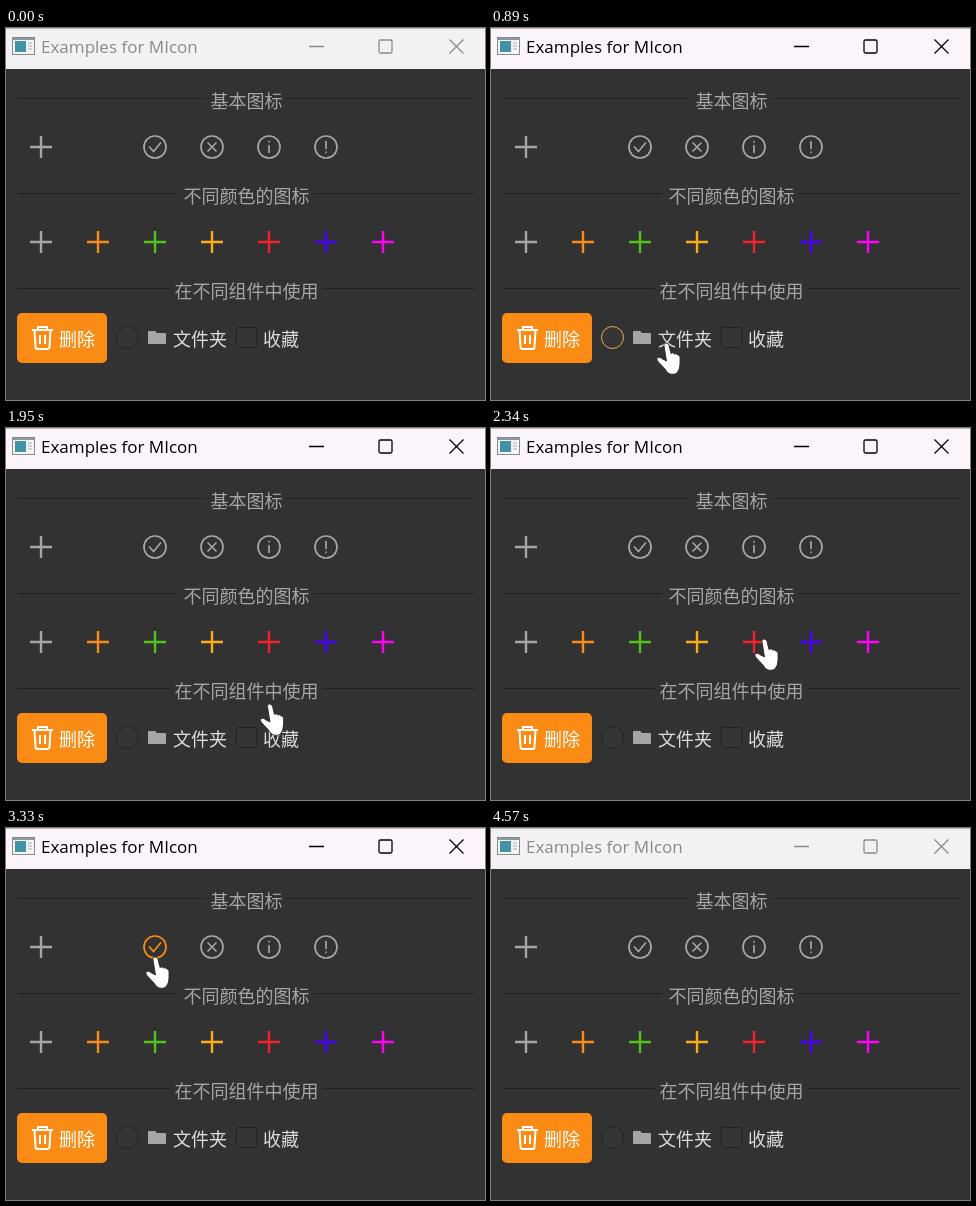
These frames come from a looping animation (479 by 372 pixels, 4650 ms). An HTML page:

```html
<!DOCTYPE html>
<html lang="zh-CN">
<head>
<meta charset="utf-8">
<title>Examples for MIcon</title>
<style>
  html, body { margin: 0; width: 100%; height: 100%; overflow: hidden; background: #323232; }
  svg { display: block; width: 479px; height: 372px; }
  text { font: 300 18px "Noto Sans CJK SC", "Noto Sans CJK", sans-serif; fill: #dcdcdc; }
  .line { fill: none; stroke: currentColor; }
  #bar { color: #8a8a8a; }
  #bar.active { color: #000; }
  #bar text { font: 400 17px "Open Sans", "Noto Sans", sans-serif; fill: currentColor; }
  #bar .back { fill: #f4f1f4; }
  #bar.active .back { fill: #fbf5fb; }
  .heading { fill: #a6a6a6; text-anchor: middle; }
  .icon { color: #a6a6a6; }
  .icon.hover { color: #fa8c16; }
  #radio, #box rect { fill: #353535; stroke: #202320; }
  #radio.hover { stroke: #f7a850; }
  #box.hover rect { stroke: #fa8c16; }
  #box path { visibility: hidden; }
  #box.checked rect { fill: #fa8c16; stroke: #fa8c16; }
  #box.checked path { visibility: visible; }
</style>
</head>
<body>
<svg viewBox="0 0 479 372">
  <rect width="479" height="372" fill="#323232"/>
  <g id="bar">
    <rect class="back" width="479" height="41"/>
    <path d="M0 .5H479" stroke="#b5b5b5"/>
    <rect x="6.500" y="9.500" width="22" height="17" fill="#f4f4f4" stroke="#858b90"/>
    <path d="M7 11H28" stroke="#8f979d" stroke-width="2"/>
    <rect x="9" y="13" width="11" height="11" fill="#4293a5"/>
    <path d="M22 15h4M22 18h4M22 21h4" stroke="#b0b0b0"/>
    <text x="35" y="25">Examples for MIcon</text>
    <g class="line" stroke-width="1.3">
      <path d="M303 18.500h15M443.500 11.500l14 14M457.500 11.500l-14 14"/>
      <rect x="373" y="12" width="13" height="13" rx="1.500"/>
    </g>
  </g>

  <g id="headings"></g>
  <g id="pluses" stroke-width="2.400"></g>
  <g id="icons" stroke-width="1.700" stroke-linecap="round" stroke-linejoin="round"></g>

  <rect x="11" y="285" width="90" height="50" rx="5" fill="#fa8c16"/>
  <path d="M26 302h21M32 302v-3h9v3M28.500 302l1 17q.2 2 2 2h10q1.800 0 2-2l1-17M34 307v9M39 307v9"
        fill="none" stroke="#fff" stroke-width="2"/>
  <text x="53" y="318" style="fill:#fff">删除</text>
  <circle id="radio" cx="121.500" cy="309.500" r="11"/>
  <path d="M142 304q0-1 1-1h6l2 2h8q1 0 1 1v9q0 1-1 1h-16q-1 0-1-1z" fill="#a6a6a6"/>
  <text x="167" y="317.500">文件夹</text>
  <g id="box">
    <rect x="230.500" y="299.500" width="20" height="20" rx="1.500"/>
    <path d="M234 309.500l5 5 8.500-9" fill="none" stroke="#fff" stroke-width="3"/>
  </g>
  <text x="257" y="317.500">收藏</text>

  <g id="pointer">
    <circle id="press" cx="2" cy="-2" r="17" fill="#ff0" fill-opacity=".58"/>
    <path d="M-3 1.500Q-3.500-1-1-1T2 1.500L4 9.500Q6 8 7.500 10Q9.500 9 10.500 11Q13 10.500 13 13.500V20
             Q13 25 10 29Q7 31 3 30Q0 29-2 25L-9.500 17Q-11 14.500-9 13.500T-4.500 15L-.5 17Z"
          fill="#fff" stroke="#222" stroke-width=".8" stroke-linejoin="round"/>
  </g>
</svg>
<script>
const LOOP = 4650;
const STEP = 74;
const PITCH = 57;
const byId = id => document.getElementById(id);

const columnX = i => 35 + i * PITCH;

byId('headings').innerHTML = ['基本图标', '不同颜色的图标', '在不同组件中使用'].map((label, i) => {
  const y = 70.5 + i * 95, half = label.length * 9 + 5;
  return `<path d="M11 ${y}H${240 - half}M${240 + half} ${y}H469" stroke="#1b211b"/>
    <text class="heading" x="240.500" y="${y + 9}">${label}</text>`;
}).join('');

const plus = (x, y, color) => `<path d="M${x - 11} ${y}h22M${x} ${y - 11}v22" stroke="${color}"/>`;
byId('pluses').innerHTML = plus(columnX(0), 119, '#a6a6a6') +
  ['#a6a6a6', '#fa8c16', '#52c41a', '#faad14', '#f5222d', '#4b00ff', '#ff00ff']
    .map((color, i) => plus(columnX(i), 214, color)).join('');

// Tick, cross, info and warning
byId('icons').innerHTML = [
  'M-5.500 0l4 4.500 7-8.500',
  'M-4-4l8 8M4-4l-8 8',
  'M0-1.500v7M0-5.500v.3',
  'M0-5.500v7M0 5.200v.3'
].map((shape, i) => `<g class="icon" transform="translate(${columnX(i + 2)} 119)">
  <circle class="line" r="11"/><path class="line" d="${shape}"/></g>`).join('');
const icons = document.querySelectorAll('.icon');

// Pointer moves: start time, number of steps, destination
const home = { x: 120, y: 400 };
const moves = [
  { start: 130, steps: 4, x: 95, y: 322 },   // button
  { start: 810, steps: 1, x: 176, y: 316 },  // radio label
  { start: 890, steps: 5, x: 259, y: 308 },  // checkbox
  { start: 1870, steps: 2, x: 270, y: 246 },
  { start: 2190, steps: 2, x: 274, y: 212 }, // red plus
  { start: 2340, steps: 2, x: 263, y: 118 }, // info
  { start: 2650, steps: 2, x: 257, y: 111 },
  { start: 2800, steps: 1, x: 236, y: 98 },
  { start: 3030, steps: 4, x: 150, y: 130 }, // tick
  { start: 3560, steps: 5, x: 100, y: 400 }
];

function pointerAt(t) {
  let { x, y } = home;
  for (const move of moves) {
    if (t < move.start) break;
    const progress = Math.min(1, Math.floor((t - move.start) / STEP) / move.steps);
    x += (move.x - x) * progress;
    y += (move.y - y) * progress;
  }
  return { x, y };
}

const during = (t, from, to) => t >= from && t < to;

function render(now) {
  const t = now % LOOP;
  const { x, y } = pointerAt(t);
  const over = (left, top, right, bottom) => x >= left && x <= right && y >= top && y <= bottom;

  byId('pointer').setAttribute('transform', `translate(${x} ${y})`);
  const pressed = during(t, 440, 660) || during(t, 1440, 1660) || during(t, 1800, 1870);
  byId('press').setAttribute('visibility', pressed ? 'visible' : 'hidden');

  byId('bar').classList.toggle('active', during(t, 440, 4570));
  byId('radio').classList.toggle('hover', over(110, 298, 222, 322));
  byId('box').classList.toggle('hover', over(230, 298, 294, 322));
  byId('box').classList.toggle('checked', during(t, 1510, 1870));
  icons.forEach((icon, i) => {
    const cx = columnX(i + 2);
    icon.classList.toggle('hover', over(cx - 12, 107, cx + 12, 131));
  });
}

const origin = performance.now();
function tick() {
  render(performance.now() - origin);
  requestAnimationFrame(tick);
}
tick();
</script>
</body>
</html>
```
